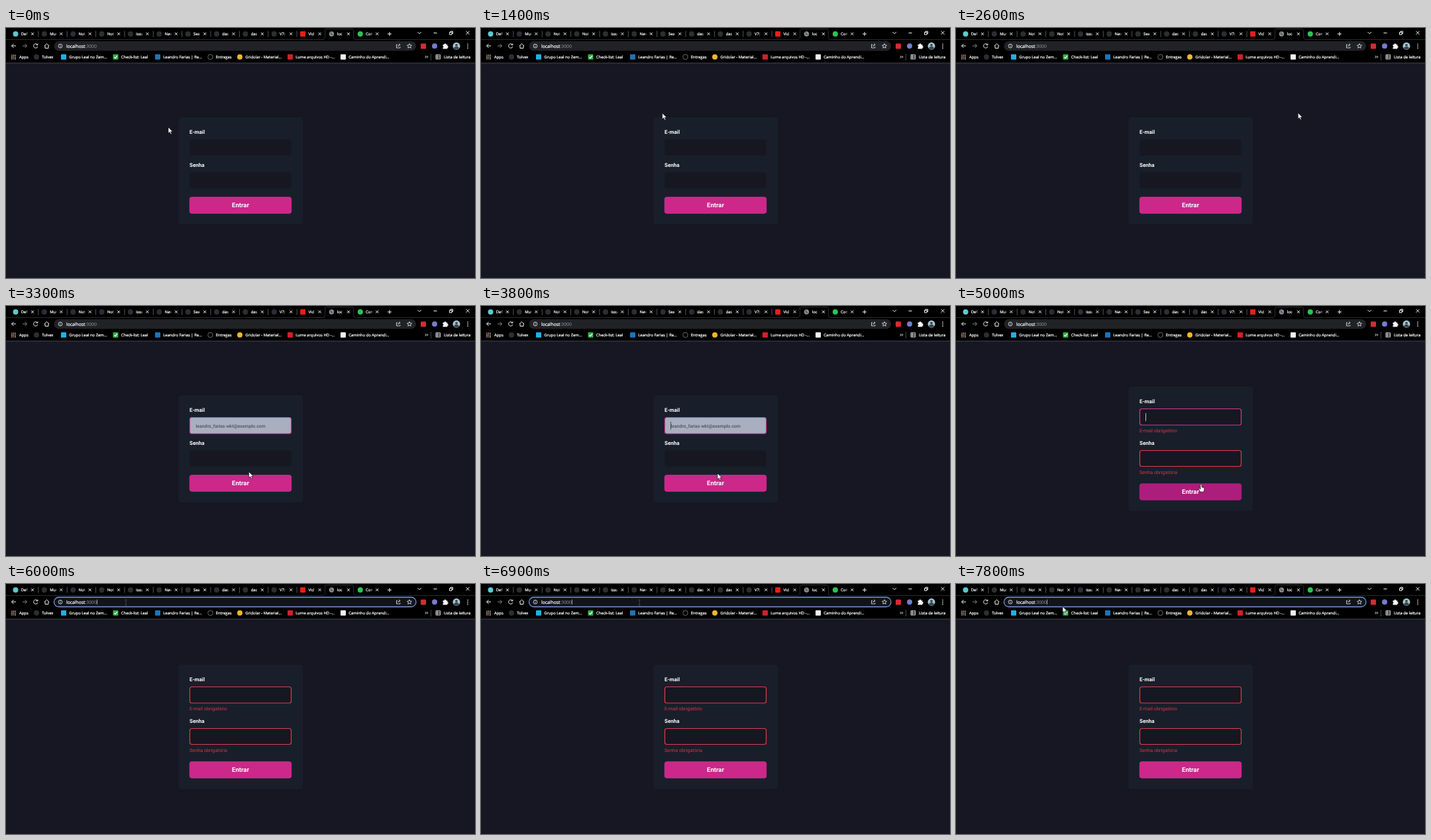
An HTML page that plays this animation: 708x378 px, repeating every 8000 ms.

```html
<!DOCTYPE html>
<html lang="pt-BR">
<head>
<meta charset="utf-8">
<title>Login</title>
<style>
html, body { margin: 0; width: 100%; height: 100%; overflow: hidden; background: #161722; }
svg { display: block; width: 708px; height: 378px; text-rendering: geometricPrecision; }
.ui { font: 5.9px "Open Sans", "Noto Sans", sans-serif; }
.ui text, text.ui { fill: #fff; stroke: #fff; stroke-width: .22px; }
.url { font-size: 6.8px; }
.url tspan { fill: #9a9fa5; stroke: none; }
.form { font-family: Roboto, sans-serif; fill: #fff; }
.label { font-size: 8px; font-weight: 700; }
.error { font-size: 7.25px; fill: #dc3049; }
.mail { font-size: 6.9px; font-weight: 500; fill: #4d505c; }
.go { font-size: 9.5px; font-weight: 700; text-anchor: middle; }
.line { fill: none; stroke: #f4f5f6; stroke-width: 1; }
.thin { stroke-width: .8; }
</style>
</head>
<body>
<svg viewBox="0 0 708 378">
  <defs>
    <linearGradient id="fade">
      <stop offset="0" stop-color="#000" stop-opacity="0"/>
      <stop offset="1" stop-color="#000"/>
    </linearGradient>
    <linearGradient id="hues" x2="1" y2="1">
      <stop offset="0" stop-color="#e5533d"/>
      <stop offset=".5" stop-color="#4b8ff0"/>
      <stop offset="1" stop-color="#d93fc0"/>
    </linearGradient>
  </defs>
  <rect width="708" height="378" fill="#161722"/>
  <rect width="708" height="53" fill="#000"/>
  <rect y="52.500" width="708" height="1" fill="#45464c"/>
  <path d="M0 17.5H478Q481.500 17.500 481.500 14V4Q481.500 1.500 484 1.500H522Q524.500 1.500 524.500 4V14Q524.500 17.500 528 17.500H708" fill="none" stroke="#35363b" stroke-width=".8"/>
  <g id="tabs" class="ui"></g>

  <!-- window buttons -->
  <path class="line" d="M576 9h6M579 6v6M621.500 6l2.700 2.700 2.700-2.700M645.500 7.500h5M669.500 6.500h3.500v3.500h-3.500zM671 6.500V5h3.500v3.500H673M694.500 4.800l5 5M699.500 4.800l-5 5"/>

  <!-- toolbar -->
  <path class="line" d="M15 27H8.500M11.500 24L8.500 27l3 3"/>
  <path class="line" style="stroke:#85888c" d="M25 27h6.500M28.500 24l3 3-3 3"/>
  <path class="line" d="M47.300 25A3.200 3.200 0 1 0 47.900 28M47.900 23.600V25.700H45.600M57.800 27.300L61.500 23.800 65.200 27.300M59 26.500V30.500H64V26.500"/>
  <rect id="bar" x="72.500" y="20" width="546.500" height="14.500" rx="7.250"/>
  <circle class="line thin" cx="82" cy="27.200" r="2.900"/>
  <path class="line thin" d="M82 26.800v2M82 25.300v.8"/>
  <text class="ui url" x="91" y="29.500">localhost<tspan>:3000</tspan></text>
  <rect id="urlCaret" x="137.200" y="23.500" width=".7" height="7.500" fill="#d5d8dd"/>
  <path class="line thin" d="M591 25h-1.500v5h5.500v-1.500M591.500 28q.4-2.600 3-2.600M593.300 23.700l1.800 1.700-1.800 1.700M609 23.700l1 2.300 2.500.2-1.900 1.600.6 2.500-2.200-1.300-2.200 1.300.6-2.500-1.900-1.600 2.500-.2z"/>
  <rect x="626" y="23.500" width="8" height="8" rx="1" fill="#d52b34"/>
  <circle cx="647" cy="27.300" r="4" fill="url(#hues)"/>
  <path fill="#fff" d="M659.500 25h2a1.400 1.400 0 0 1 2.800 0h2v2.200a1.400 1.400 0 0 1 0 2.800v1.500h-6.800v-2a1.300 1.300 0 0 0 0-2.500z"/>
  <circle cx="680" cy="27.300" r="5.500" fill="#a9c3cc"/>
  <path fill="#344653" d="M676 31.200q.3-3.200 4-3.200t4 3.200q-4 2.600-8 0z"/>
  <circle cx="680" cy="25.800" r="1.900" fill="#344653"/>
  <path fill="#fff" d="M696.300 23.700h1.400v1.400h-1.400zM696.300 26.600h1.400v1.400h-1.400zM696.300 29.500h1.400v1.400h-1.400z"/>

  <g id="marks" class="ui"></g>

  <!-- login card -->
  <g class="form">
    <rect id="card" x="260.500" width="187.500" rx="4" fill="#181f2a"/>
    <g id="mailGroup">
      <text class="label" x="277" y="160">E-mail</text>
      <rect id="mailBox" x="277.500" y="168.500" width="153" height="24.500" rx="3" stroke-width="1.200"/>
      <text id="preview" class="mail" x="286.500" y="184">leandro_farias-wkt@exemplo.com</text>
      <rect id="mailCaret" x="286" y="175" width=".8" height="12"/>
      <text class="error" x="277" y="204">E-mail obrigatório</text>
    </g>
    <text class="label" x="277" y="210">Senha</text>
    <rect id="passBox" x="277.500" y="218.500" width="153" height="24" rx="3" fill="#171721" stroke-width="1.200"/>
    <text class="error" x="277" y="254">Senha obrigatória</text>
    <g id="goGroup">
      <rect id="go" x="277.300" y="255.800" width="153.400" height="24.400" rx="3" stroke-width=".9"/>
      <text class="go" x="354" y="270.700">Entrar</text>
    </g>
  </g>

  <g id="arrow"><path d="M0 0V9.200L2.100 7.200 3.600 10.500 5.200 9.800 3.700 6.700H6.700Z" fill="#fff" stroke="#000" stroke-width=".6"/></g>
  <g id="beam"><path d="M-1.500-4H1.500M0-4V4M-1.500 4H1.500" fill="none" stroke="#55585f" stroke-width=".7"/></g>
  <g id="hand"><path d="M-1 1Q0-.8 1 1V4.500L4 5.200Q5 5.600 4.800 7L4 11.500H-1L-3.600 7.300Q-3.600 5.900-2.200 6.500L-1 7.600Z" fill="#fff" stroke="#111" stroke-width=".6"/></g>
</svg>
<script>
const $ = id => document.getElementById(id);
const LOOP = 8000, STEP = 100;
const GRAY = '#2b2e33';

const dot = (x, y, fill, r = 4) => `<circle cx="${x}" cy="${y}" r="${r}" fill="${fill}"/>`;
const square = (x, y, fill) => `<rect x="${x - 4}" y="${y - 4}" width="8" height="8" rx="1" fill="${fill}"/>`;
const text = (x, y, s) => `<text x="${x}" y="${y}">${s}</text>`;

const tabNames = ['Def', 'Mur', 'Not', 'Not', 'issu', 'Nav', 'Sea', 'das', 'das', 'V7:', 'Vid', 'loc', 'Con'];
const ACTIVE = 11;
const globe = x => dot(x, 9, '#8b9096', 3.7) +
  `<path d="M${x - 2} 7l2 1-1 2M${x + 2} 9l-2 2" fill="none" stroke="#30343a"/>`;
const tabIcon = (i, x) =>
  i === 0 ? dot(x, 9, '#5cc9cf') :
  i === 10 ? square(x, 9, '#e62117') :
  i === ACTIVE ? globe(x) :
  dot(x, 9, i === 12 ? '#2bc553' : GRAY);

$('tabs').innerHTML = tabNames.map((name, i) => {
  const x = 14.5 + i * 43.36;
  const edge = i && i < ACTIVE ? `<path d="M${x - 9} 4.500v9" stroke="#6a6d72" stroke-width=".8"/>` : '';
  return edge + tabIcon(i, x) + text(x + 8.3, 11.2, name) +
    `<rect x="${x + 15.5}" y="3" width="4" height="11" fill="url(#fade)"/>` +
    `<rect x="${x + 19.5}" y="3" width="12" height="11" fill="#000"/>` +
    `<path class="line" d="M${x + 23.5} 6.800l4 4m0-4l-4 4"/>`;
}).join('');

const marks = [
  [46, 'Tolvex', dot, GRAY],
  [87, 'Grupo Leal no Zem...', square, '#1ab3e6'],
  [165.5, 'Check-list: Leal', square, '#2fae4a'],
  [229, 'Leandro Farias | Re...', square, '#1b75bc'],
  [308.5, 'Entregas', dot, '#7b7f85'],
  [353, 'Gridolar - Material...', dot, '#f0b62c'],
  [429, 'Lume arquivos HD -...', square, '#d3202c'],
  [509, 'Caminho do Aprendi...', square, '#f1f1f1']
];
const grid = [0, 1, 2].map(r => [0, 1, 2].map(c =>
  `<rect x="${8 + c * 2.6}" y="${40.5 + r * 2.6}" width="1.700" height="1.700" fill="${['#e57368', '#d8c06a', '#7fb0e8'][(r + c) % 3]}"/>`
).join('')).join('');
$('marks').innerHTML = grid + text(20, 46, 'Apps') +
  marks.map(([x, s, icon, fill]) => icon(x, 43.8, fill) + text(x + 8.3, 46, s)).join('') +
  dot(308.5, 43.8, '#000', 3.2) +
  '<path d="M163.300 43.800l1.700 1.800 3-3.600" fill="none" stroke="#fff" stroke-width="1.200"/>' +
  '<path class="line" d="M632.800 42l1.500 1.700-1.500 1.700M635.300 42l1.500 1.700-1.500 1.700"/>' +
  '<path d="M641.500 39v10" stroke="#55585d" stroke-width=".8"/>' +
  '<path class="line thin" d="M649 40.500h6.500v6.500h-6.500zM649 42.700h6.500M649 44.900h6.500M651.200 40.500v6.500"/>' +
  text(661, 46, 'Lista de leitura');

// pointer path: time, x, y, shape
const path = [
  [0, 245, 150, 'arrow'], [1200, 245, 150, 'arrow'],
  [1500, 288, 118, 'arrow'], [1800, 341, 74, 'arrow'], [1900, 341, 74, 'arrow'],
  [2100, 448, 90, 'arrow'], [2200, 515, 116, 'arrow'], [2500, 515, 116, 'arrow'],
  [2600, 516.3, 128.3, 'arrow'], [2700, 455, 162, 'arrow'],
  [2800, 402, 181, 'beam'], [3000, 392, 184, 'beam'],
  [3100, 380, 212, 'arrow'], [3400, 360, 270, 'arrow'],
  [3800, 357, 253, 'arrow'], [3900, 372, 250, 'arrow'], [4200, 483, 236, 'arrow'],
  [4300, 483, 240, 'arrow'], [4400, 446, 252, 'arrow'],
  [4500, 396, 258, 'hand'], [4700, 372, 266, 'hand'], [5000, 370, 269.5, 'hand'], [5200, 370, 269.5, 'hand'],
  [5300, 358, 240, 'arrow'], [5700, 212, 62, 'arrow'],
  [5800, 190, 29, 'beam'], [6000, 181, 28, 'beam'], [6300, 181, 28, 'beam'],
  [6700, 262, 28, 'beam'], [7200, 205, 28, 'beam'],
  [7500, 172, 29, 'beam'], [7600, 164, 36, 'arrow'], [7800, 161, 34, 'arrow'], [8000, 161, 34, 'arrow']
];

function pointer(t) {
  const i = Math.max(0, path.findIndex(p => p[0] > t) - 1);
  const [t0, x0, y0, shape] = path[i], [t1, x1, y1] = path[i + 1];
  const k = (t - t0) / (t1 - t0);
  return { x: x0 + (x1 - x0) * k, y: y0 + (y1 - y0) * k, shape };
}

const set = (id, attrs) => { for (const k in attrs) $(id).setAttribute(k, attrs[k]); };
const show = (el, on) => { el.style.display = on ? '' : 'none'; };
const within = (t, a, b) => t >= a && t < b;
const blink = (t, start, half) => Math.floor((t - start) / half) % 2 === 0;

function draw(t) {
  const p = pointer(t);
  for (const id of ['arrow', 'beam', 'hand']) show($(id), id === p.shape);
  set(p.shape, { transform: `translate(${p.x} ${p.y})` });

  const failed = t >= 4800, typing = t >= 5900;
  const preview = within(t, 3200, 4000);
  const focus = within(t, 2800, 4200) || within(t, 4800, 5900);
  const shift = failed ? 13 : 0;
  const red = failed ? '#dc3d4c' : 'none';

  set('card', { y: 135 - shift, height: 162 + 2 * shift });
  set('mailGroup', { transform: `translate(0 ${-shift})` });
  set('goGroup', { transform: `translate(0 ${shift})` });
  set('mailBox', { fill: preview ? '#a9afbf' : '#171721', stroke: focus ? '#d23a96' : red });
  set('passBox', { stroke: red });
  show($('preview'), preview);
  show($('mailCaret'), focus && blink(t, failed ? 4800 : 2800, 500));
  set('mailCaret', { fill: preview ? '#30323c' : '#eceef0' });
  document.querySelectorAll('.error').forEach(e => show(e, failed));
  const [fill, stroke] = p.shape !== 'hand' ? ['#cb2889', '#dc2f96'] :
    failed ? ['#ab1e7b', '#b82085'] : ['#bd2585', '#d02b91'];
  set('go', { fill, stroke });

  set('bar', { fill: typing ? '#11141b' : '#202226', stroke: typing ? '#7499dd' : 'none', 'stroke-width': 1.3 });
  show($('urlCaret'), typing && blink(t, 5900, 475));
}

function tick() {
  draw(Math.floor(performance.now() % LOOP / STEP) * STEP);
  requestAnimationFrame(tick);
}
tick();
</script>
</body>
</html>
```
